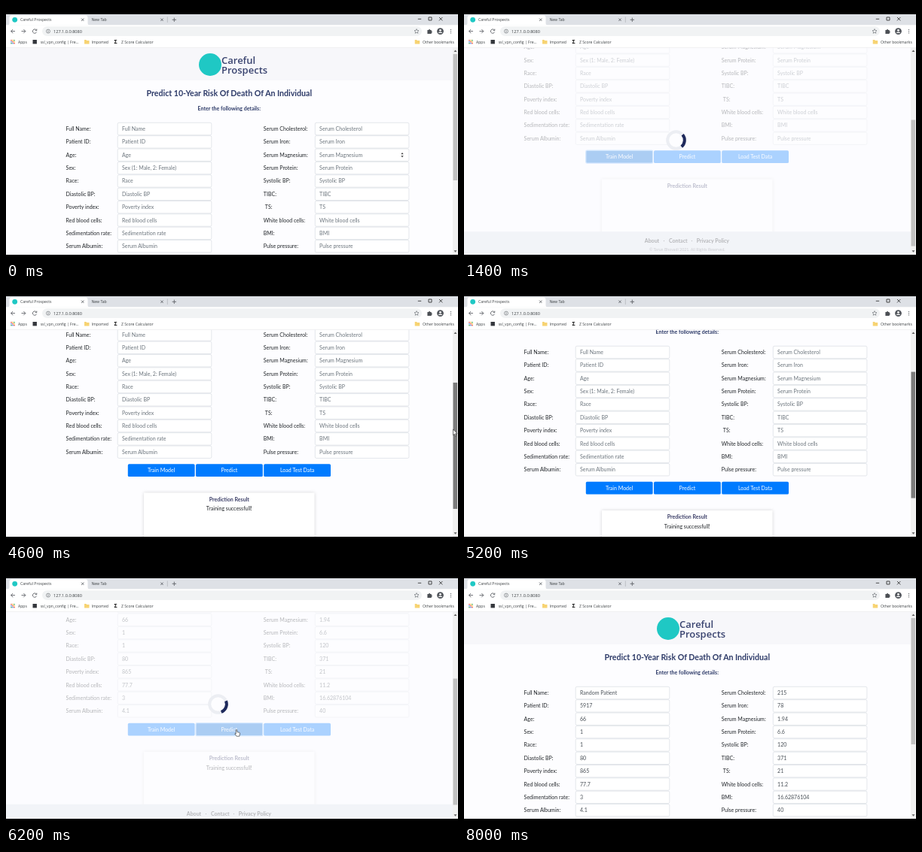
An HTML page for the animation above (8.1 s loop, 600 px wide and 338 px high).

```html
<!DOCTYPE html>
<html lang="en">
<head>
<meta charset="utf-8">
<title>Careful Prospects</title>
<style>
  html, body { margin: 0; width: 100%; height: 100%; overflow: hidden; background: #000; }
  svg { display: block; width: 100vw; height: 100vh; }
  text { font: 7.03px Lato, sans-serif; fill: #212529; }
  .ui { font: 5.1px "Open Sans", sans-serif; fill: #3c4043; }
  .url { font-size: 5.6px; }
  .mid { text-anchor: middle; }
  .bold { font-weight: 700; }
  .navy { fill: #2d3a68; }
  .title { font-size: 10.6px; }
  .brand { font: 600 13px "Open Sans", sans-serif; font-stretch: 75%; fill: #3a4470; }
  .hint { fill: #6c757d; }
  .value { fill: #495057; }
  .small { font-size: 5.3px; fill: #6a6f78; }
  .field { fill: #fff; stroke: #ced4da; stroke-width: .55; }
  .button rect { fill: #007bff; }
  .button text { fill: #fff; }
  .button.focus rect { fill: #0069d9; stroke: #80bdff; stroke-width: 1.3; }
  .line { fill: none; stroke: #5f6368; stroke-width: .9; }
  #card { filter: drop-shadow(0 0 2px rgba(0, 0, 0, .16)); }
</style>
</head>
<body>
<svg viewBox="0 0 600 338" preserveAspectRatio="none">
  <defs>
    <clipPath id="view"><rect y="55.5" width="593" height="275.5"/></clipPath>
  </defs>
  <rect width="600" height="338" fill="#000"/>
  <rect y="11" width="600" height="320" fill="#fdfdff"/>

  <g clip-path="url(#view)">
    <g id="page">
      <rect y="55" width="593" height="44" fill="#f7f7fa"/>
      <circle cx="271" cy="78" r="15" fill="#1fc8c4"/>
      <text class="brand" x="286" y="77">Careful</text>
      <text class="brand" x="286" y="90">Prospects</text>
      <text class="mid bold navy title" x="296.3" y="119.6">Predict 10-Year Risk Of Death Of An Individual</text>
      <text class="mid bold navy" x="296.3" y="139.3">Enter the following details:</text>
      <g id="form"></g>
      <path id="stepper" d="M524.3 197.3l1.7-2.3 1.7 2.3zM524.3 199.2l1.7 2.3 1.7-2.3z" fill="#444"/>
      <g id="buttons"></g>
      <rect id="card" x="183" y="374" width="226.5" height="90" fill="#fff"/>
      <text class="mid bold" x="296.3" y="385.2" style="fill:#3c3f68">Prediction Result</text>
      <text class="mid" id="result" x="296.3" y="397.8">Training successfull!</text>
      <rect y="443.7" width="593" height="32" fill="#dfe3ea"/>
      <g class="mid">
        <text class="bold" x="249.5" y="458.9">About</text>
        <text x="265.5" y="458.9">·</text>
        <text class="bold" x="284.3" y="458.9">Contact</text>
        <text x="302.5" y="458.9">·</text>
        <text class="bold" x="330.4" y="458.9">Privacy Policy</text>
        <text class="small" x="296.3" y="469">© Tarun Bhovadi 2021. All Rights Reserved.</text>
      </g>
    </g>
    <g id="overlay">
      <rect y="55" width="593" height="276" fill="#fdfdff" opacity=".68"/>
      <circle cx="281.5" cy="178.5" r="11.3" fill="#fdfdff" stroke="#eceef3" stroke-width="4"/>
      <path id="arc" d="M289.5 170.5a11.3 11.3 0 0 1 0 16" fill="none" stroke="#1f2a5c" stroke-width="4"/>
    </g>
  </g>

  <rect x="593" y="55.5" width="7" height="275.5" fill="#f1f1f1"/>
  <path d="M594.5 61l2-2.4 2 2.4zM594.5 325.3l2 2.4 2-2.4z" fill="#606060"/>
  <rect id="thumb" x="593.5" y="64" width="5.6" height="168"/>

  <g id="chrome">
    <rect y="11" width="600" height="14.5" fill="#dee1e6"/>
    <path d="M2 25.5q2.5 0 2.5-3v-7q0-3 3-3h98q3 0 3 3v7q0 3 2.5 3z" fill="#fff"/>
    <circle cx="11.7" cy="18.3" r="3.4" fill="#1fc8c4"/>
    <text class="ui" x="19" y="20.2">Careful Prospects</text>
    <text class="ui" x="113.5" y="20.2">New Tab</text>
    <path class="line" d="M100 16.6l3.4 3.4m0-3.4l-3.4 3.4M205.3 16.6l3.4 3.4m0-3.4l-3.4 3.4M223.3 15.6v5.4m-2.7-2.7h5.4"/>
    <path d="M214.3 14.5v7.5" stroke="#9a9da2" stroke-width=".5"/>
    <path class="line" d="M546.8 17.3h4.4M561 15h4v4h-4zM575 15l4.4 4.4m0-4.4l-4.4 4.4" style="stroke:#222;stroke-width:.8"/>

    <rect y="25.5" width="600" height="30" fill="#fff"/>
    <path class="line" d="M12 33.6H6.6m2.6-2.6l-2.6 2.6 2.6 2.6M20.5 33.6h5.4m-2.6-2.6l2.6 2.6-2.6 2.6M40.2 31.9a2.7 2.7 0 1 0 .4 2.7M40.8 30.6v2h-2"/>
    <rect x="48" y="27.3" width="504" height="12.6" rx="6.3" fill="#f1f3f4"/>
    <circle class="line" cx="56" cy="33.6" r="2.5" style="stroke-width:.6"/>
    <path d="M56 33.2v1.8M56 31.9v.7" stroke="#5f6368" stroke-width=".7"/>
    <text class="ui url" x="63" y="35.7">127.1.0.0:8080</text>
    <path class="line" d="M545 30.5l.9 2 2.1.2-1.6 1.5.5 2.1-1.9-1.1-1.9 1.1.5-2.1-1.6-1.5 2.1-.2z" style="stroke-width:.6"/>
    <path d="M559.4 32h1.6a1.1 1.1 0 0 1 2.2 0h1.5v1.5a1.1 1.1 0 0 1 0 2.2v1.3h-5.3z" fill="#4b4f54"/>
    <circle cx="576.5" cy="33.6" r="4.4" fill="#52565c"/>
    <circle cx="576.5" cy="32.3" r="1.4" fill="#fff"/>
    <path d="M573.8 36a2.8 2 0 0 1 5.4 0z" fill="#fff"/>
    <path d="M590.5 31.3v.1m0 2.2v.1m0 2.2v.1" stroke="#5f6368" stroke-width="1.2" stroke-linecap="round"/>

    <g id="apps"></g>
    <text class="ui" x="16" y="49.5">Apps</text>
    <rect x="35.5" y="45" width="5.4" height="5.4" fill="#34373c"/>
    <text class="ui" x="45.7" y="49.5">ssl_vpn_config | Fre...</text>
    <path d="M104 45h2.4l.8.9h3.3v4.7H104zM542.7 45h2.4l.8.9h3.3v4.7h-6.5z" fill="#f7d372"/>
    <text class="ui" x="113.7" y="49.5">Imported</text>
    <text class="ui bold" x="143.5" y="50.2" style="font-size:7px;fill:#111">Σ</text>
    <text class="ui" x="153" y="49.5">Z Score Calculator</text>
    <text class="ui" x="553" y="49.5">Other bookmarks</text>
    <path d="M0 55.3h600" stroke="#dcdee2" stroke-width=".5"/>
  </g>

  <path id="arrow" d="M0 0v8l1.9-1.7 1.3 3 1.2-.5-1.3-2.9h2.5z" fill="#fff" stroke="#222" stroke-width=".6"/>
  <path id="hand" transform="translate(304 212)" d="M1.2 4.8V.9q.8-1 1.6 0v2.7l3 .7q.8.3.7 1.2l-.6 3.7H2L-.3 6q0-1 1.5.2z" fill="#fff" stroke="#222" stroke-width=".6"/>
</svg>

<script>
const LOOP = 8100, STEP = 100, PITCH = 17.36;
const $ = id => document.getElementById(id);

// label, test value
const left = [
  ["Full Name", "Random Patient"], ["Patient ID", "5917"], ["Age", "66"],
  ["Sex", "1"], ["Race", "1"], ["Diastolic BP", "80"], ["Poverty index", "865"],
  ["Red blood cells", "77.7"], ["Sedimentation rate", "3"], ["Serum Albumin", "4.1"]
];
const right = [
  ["Serum Cholesterol", "215"], ["Serum Iron", "78"], ["Serum Magnesium", "1.94"],
  ["Serum Protein", "6.6"], ["Systolic BP", "120"], ["TIBC", "371"], ["TS", "21"],
  ["White blood cells", "11.2"], ["BMI", "16.62876104"], ["Pulse pressure", "40"]
];

function column(rows, labelX, boxX) {
  return rows.map(([name, value], i) => {
    const y = 163.5 + i * PITCH;
    const hint = name === "Sex" ? "Sex (1: Male, 2: Female)" : name;
    const x = name === "TS" ? labelX + 2 : labelX;
    return `<text x="${x}" y="${y + 2.5}">${name}:</text>
      <rect class="field" x="${boxX}" y="${y - 8.2}" width="124.6" height="16.4" rx="1.7"/>
      <text class="hint" x="${boxX + 5.8}" y="${y + 2.5}">${hint}</text>
      <text class="value" x="${boxX + 5.8}" y="${y + 2.5}">${value}</text>`;
  }).join("");
}
$("form").innerHTML = column(left, 79.6, 148.2) + column(right, 341.8, 410.3);

$("buttons").innerHTML = ["Train Model", "Predict", "Load Test Data"].map((name, i) => {
  const x = 161.8 + i * 90.2;
  return `<g class="button"><rect x="${x}" y="335.7" width="88.8" height="16.9" rx="1.7"/>
    <text class="mid" x="${x + 44.4}" y="346.8">${name}</text></g>`;
}).join("");

const tints = ["#e8453c", "#f9bb2d", "#3aa757", "#4688f1"];
$("apps").innerHTML = Array.from({ length: 9 }, (_, i) =>
  `<rect x="${6.3 + i % 3 * 2}" y="${45 + Math.floor(i / 3) * 2}" width="1.4" height="1.4" fill="${tints[i % 4]}"/>`
).join("");

const scrollKeys = [[200, 0], [700, 143.5], [3900, 143.5], [4600, 101.5], [4900, 78],
  [5700, 78], [6000, 132], [6800, 132], [7400, 0]];
const veilKeys = [[700, 0], [900, 1], [2700, 1], [3000, 0], [6000, 0], [6200, 1], [6500, 1], [6800, 0]];

function at(keys, t) {
  const i = keys.findIndex(k => k[0] > t);
  if (i < 0) return keys[keys.length - 1][1];
  if (i === 0) return keys[0][1];
  const [t0, a] = keys[i - 1], [t1, b] = keys[i];
  return a + (b - a) * (t - t0) / (t1 - t0);
}
const within = (t, from, to) => t >= from && t < to;
const show = (el, on) => { el.style.visibility = on ? "visible" : "hidden"; };

const hints = document.querySelectorAll(".hint");
const values = document.querySelectorAll(".value");
const [train, predict, load] = document.querySelectorAll(".button");

function draw(t) {
  const scroll = at(scrollKeys, t), bar = scroll * .61;
  $("page").setAttribute("transform", `translate(0 ${-scroll})`);
  $("thumb").setAttribute("transform", `translate(0 ${bar})`);
  const drag = within(t, 200, 700) || within(t, 3900, 5800) || within(t, 6800, 7500);
  $("thumb").setAttribute("fill", drag ? "#7b7b7b" : "#c1c1c1");

  const spin = t < 4000 ? 5 + .36 * (t - 1400) : 23 + .36 * (t - 6200);
  $("overlay").setAttribute("opacity", at(veilKeys, t));
  $("arc").setAttribute("transform", `rotate(${spin} 281.5 178.5)`);

  const loaded = t >= 5400;
  hints.forEach(el => show(el, !loaded));
  values.forEach(el => show(el, loaded));
  show($("result"), t >= 2800);
  show($("stepper"), t < 200);

  train.classList.toggle("focus", within(t, 700, 3900));
  load.classList.toggle("focus", within(t, 5400, 6000));
  predict.classList.toggle("focus", within(t, 6000, 6800));

  show($("arrow"), within(t, 3900, 4900));
  $("arrow").setAttribute("transform", `translate(593.5 ${126 + bar})`);
  show($("hand"), within(t, 6000, 6600));
}

const start = performance.now();
function tick() {
  const t = (performance.now() - start) % LOOP;
  draw(Math.floor(t / STEP) * STEP);
  requestAnimationFrame(tick);
}
tick();
</script>
</body>
</html>
```
